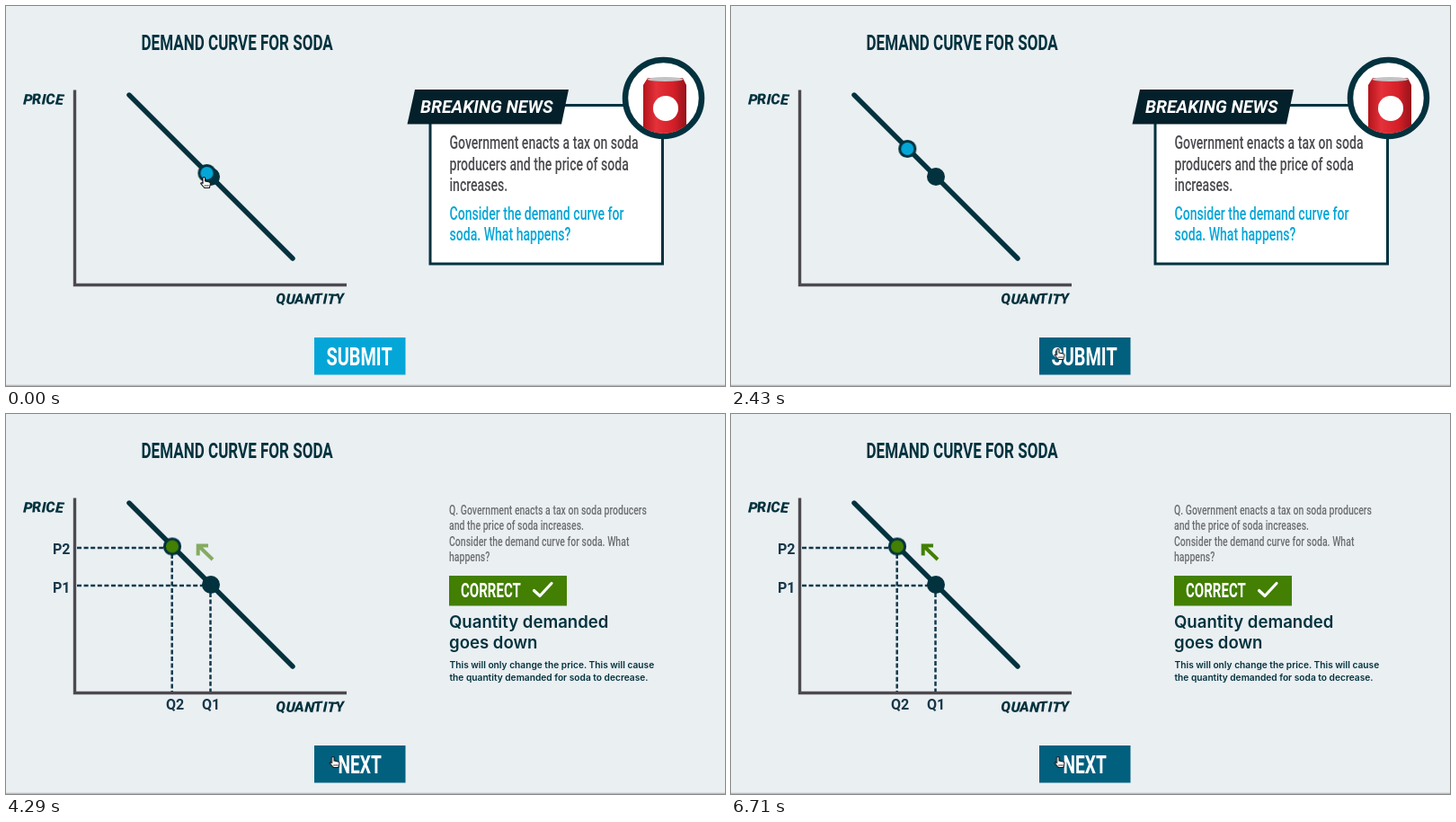
These frames come from a looping animation (800 px wide and 423 px high, 6.85 s). An HTML page:

```html
<!DOCTYPE html>
<html lang="en">
<head>
<meta charset="utf-8">
<title>Demand curve</title>
<style>
  :root { --ink: #02323e; --cyan: #04a6d8; --green: #427f02; --loop: 6850ms; }
  html, body { margin: 0; width: 100%; height: 100%; overflow: hidden; background: #eaeff2; }
  svg { display: block; width: 100vw; height: 100vh; }
  text { font-family: Roboto, sans-serif; fill: var(--ink); white-space: pre; }

  /* one condensed cut for all headline and body type */
  .narrow { transform-box: fill-box; transform-origin: 0 0; transform: scaleX(.71); font-weight: 700; }
  .body text { font-size: 19.8px; font-weight: 500; fill: #4b4b50; }
  .body .ask { fill: var(--cyan); }
  .recap text { font-size: 14.8px; font-weight: 500; fill: #6c6e70; }
  .label { font-size: 16px; font-weight: 700; fill: #17384a; }
  .marker { font-weight: 800; font-style: italic; }
  .white { fill: #fff; }
  .answer, .why { font-family: Inter, sans-serif; font-weight: 600; }
  .answer { font-size: 18.6px; }
  .why { font-size: 10.2px; }
  .guide { stroke: #12384b; stroke-width: 2.5; stroke-dasharray: 5 2.6; fill: none; }

  /* 48 held poses per loop */
  .scene-a, .scene-b, .dot, .dot circle, .mouse, .arrow, .hand, .button, .ripple, .guides, .shift {
    animation: var(--loop) step-end -5ms infinite;
  }
  .scene-a { animation-name: leave; }
  .scene-b { animation-name: enter; }
  .dot { animation-name: drag; }
  .dot circle { animation-name: grade; }
  .mouse { animation-name: mouse; }
  .arrow { animation-name: arrow; }
  .hand { animation-name: hand; }
  .button { animation-name: hover; }
  .ripple { animation-name: ripple; transform-box: fill-box; transform-origin: center; }
  .guides { animation-name: guides; }
  .shift { animation-name: shift; }

  @keyframes leave { 0% { opacity: 1 } 37.5%, 100% { opacity: 0 } }
  @keyframes enter { 0% { opacity: 0 } 37.5%, 100% { opacity: 1 } }
  @keyframes grade { 0% { fill: var(--cyan) } 37.5%, 100% { fill: var(--green) } }
  @keyframes drag {
    0% { transform: translate(223.5px, 186px); animation-timing-function: steps(5) }
    10.416% { transform: translate(197.2px, 160px) }
    14.583% { transform: translate(196.3px, 159px) }
    37.5% { transform: translate(190px, 152px) }
    39.583%, 100% { transform: translate(185px, 147.5px) }
  }
  @keyframes mouse {
    0% { transform: translate(219px, 190px); animation-timing-function: steps(4) }
    8.333% { transform: translate(192px, 165px); animation-timing-function: steps(2) }
    12.5% { transform: translate(177px, 152px); animation-timing-function: steps(2) }
    16.666% { transform: translate(190px, 170px); animation-timing-function: steps(5) }
    27.083% { transform: translate(332px, 318px); animation-timing-function: steps(3) }
    33.333%, 100% { transform: translate(362.500px, 381px) }
  }
  @keyframes arrow { 0% { opacity: 0 } 10.416% { opacity: 1 } 31.25%, 100% { opacity: 0 } }
  @keyframes hand { 0% { opacity: 1 } 10.416% { opacity: 0 } 31.25%, 100% { opacity: 1 } }
  @keyframes hover {
    0% { fill: #04a6d8 }
    31.25% { fill: #0383ac }
    33.333%, 100% { fill: #02607f }
  }
  @keyframes ripple {
    0% { opacity: 0; transform: scale(.1) }
    35.416% { opacity: .3; transform: scale(.1); animation-timing-function: steps(4) }
    43.75%, 100% { opacity: 0; transform: scale(1.9) }
  }
  @keyframes guides {
    0% { opacity: 0 }
    47.916% { opacity: 0; animation-timing-function: steps(4) }
    56.25%, 100% { opacity: 1 }
  }
  @keyframes shift {
    0% { opacity: 0 }
    56.25% { opacity: 0; animation-timing-function: steps(5) }
    66.666%, 100% { opacity: 1 }
  }
</style>
</head>
<body>
<svg viewBox="0 0 800 423" preserveAspectRatio="none">
  <defs>
    <clipPath id="lens"><circle cx="731.5" cy="102.5" r="39.5"/></clipPath>
    <clipPath id="press"><rect x="343" y="369" width="101.5" height="41.5"/></clipPath>
    <linearGradient id="tin">
      <stop offset="0" stop-color="#b3141b"/>
      <stop offset=".3" stop-color="#e4313a"/>
      <stop offset=".7" stop-color="#d51f28"/>
      <stop offset="1" stop-color="#96121a"/>
    </linearGradient>
  </defs>

  <rect width="800" height="423" fill="#eaeff2"/>
  <rect y="421.7" width="800" height="1.3" fill="#b9bcbf"/>

  <text class="narrow" x="150.5" y="49" font-size="24">DEMAND CURVE FOR SODA</text>

  <!-- chart -->
  <text class="marker" x="19" y="109.5" font-size="16.3" rotate="3 -4 2 -3 4">PRICE</text>
  <text class="marker" x="300.5" y="331.5" font-size="16" rotate="-3 3 -2 4 -3 2 4 -3">QUANTITY</text>
  <path d="M76.5 93.5V310.5H379" fill="none" stroke="#4c494f" stroke-width="3.4"/>
  <g class="guides">
    <path class="guide" d="M79 149H176M79 191H219M184.7 156V309M227.5 199V309"/>
    <text class="label" x="52" y="156">P2</text>
    <text class="label" x="52" y="198.5">P1</text>
    <text class="label" x="178" y="329">Q2</text>
    <text class="label" x="218" y="329">Q1</text>
  </g>
  <path d="M137 99L319 281" stroke="#02323e" stroke-width="5.4" stroke-linecap="round"/>
  <circle cx="228" cy="190" r="10" fill="#02323e"/>
  <g class="dot"><circle r="8.6" stroke="#02323e" stroke-width="3"/></g>
  <path class="shift" d="M230 162L214.5 147M213.7 157.5V146.5H225" fill="none" stroke="#427f02" stroke-width="4"/>

  <rect class="button" x="343" y="369" width="101.5" height="41.5"/>
  <g clip-path="url(#press)"><circle class="ripple" cx="366" cy="387" r="37" fill="#fff"/></g>

  <!-- question -->
  <g class="scene-a">
    <rect x="472" y="110.5" width="258.5" height="176.5" fill="#fff" stroke="#02323e" stroke-width="3"/>
    <path d="M455 93H626L618 131.5H446.5Z" fill="#03202b"/>
    <text class="white" x="461" y="119" font-size="19.4" font-weight="700" font-style="italic">BREAKING NEWS</text>
    <circle cx="731.5" cy="102.5" r="42.5" fill="#fff" stroke="#02323e" stroke-width="6.5"/>
    <g clip-path="url(#lens)">
      <path d="M714 80H753L757 88V145H709V88Z" fill="url(#tin)"/>
      <ellipse cx="733.5" cy="81.5" rx="20" ry="2.6" fill="#c3c3c6"/>
      <circle cx="734" cy="114" r="14" fill="#fff"/>
    </g>
    <g class="body">
      <text class="narrow" x="493.5" y="159.5">Government enacts a tax on soda</text>
      <text class="narrow" x="493.5" y="183">producers and the price of soda</text>
      <text class="narrow" x="493.5" y="206.5">increases.</text>
      <text class="narrow ask" x="493.5" y="238">Consider the demand curve for</text>
      <text class="narrow ask" x="493.5" y="261.5">soda. What happens?</text>
    </g>
    <text class="narrow white" x="356.5" y="400" font-size="28">SUBMIT</text>
  </g>

  <!-- result -->
  <g class="scene-b">
    <g class="recap">
      <text class="narrow" x="493" y="112">Q. Government enacts a tax on soda producers</text>
      <text class="narrow" x="493" y="129.5">and the price of soda increases.</text>
      <text class="narrow" x="493" y="147">Consider the demand curve for soda. What</text>
      <text class="narrow" x="493" y="164.5">happens?</text>
    </g>
    <rect x="493" y="180" width="131" height="33.5" fill="#427f02"/>
    <text class="narrow white" x="506" y="204" font-size="21.2">CORRECT</text>
    <path d="M587.5 196.5L594 202.5L607 188.5" fill="none" stroke="#fff" stroke-width="3.2" stroke-linecap="round" stroke-linejoin="round"/>
    <text class="answer" x="493" y="237.5">Quantity demanded</text>
    <text class="answer" x="493" y="261">goes down</text>
    <text class="why" x="493.5" y="283">This will only change the price. This will cause</text>
    <text class="why" x="493.5" y="297">the quantity demanded for soda to decrease.</text>
    <text class="narrow white" x="369.5" y="400.5" font-size="27">NEXT</text>
  </g>

  <g class="mouse" stroke-linejoin="round">
    <path class="arrow" d="M0 0V11L2.5 8.8L4.2 12.5L6 11.7L4.4 8.2H7.8Z" fill="#111" stroke="#fff" stroke-width=".8"/>
    <g class="hand">
      <path d="M0 1.5Q1.3-.5 2.6 1.5V5L7.3 6Q8.6 6.5 8.4 8.2L7.4 12.5H1.8L-2.3 7.6Q-1.8 6.2 0 7.4Z" fill="#fff" stroke="#111" stroke-width="1.1"/>
      <path d="M2.6 9V11M4.3 9V11M6 9V11" stroke="#111" stroke-width=".7"/>
    </g>
  </g>
</svg>
</body>
</html>
```
